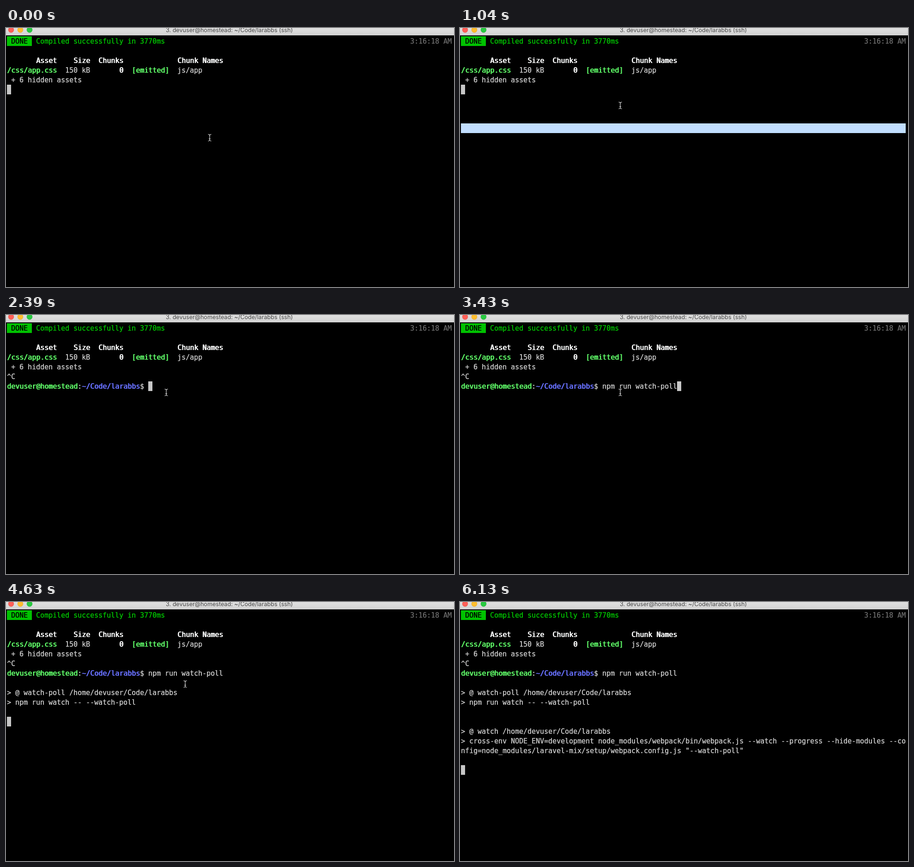
Animation, 970 px wide and 562 px high, one loop 7980 ms. Source, as an HTML page with a canvas:

```html
<!DOCTYPE html>
<html lang="en">
<head>
<meta charset="utf-8">
<title>Terminal session</title>
<style>
  html, body { margin: 0; width: 100%; height: 100%; overflow: hidden; background: #000; }
  canvas { display: block; width: 970px; height: 562px; }
</style>
</head>
<body>
<canvas id="stage" width="970" height="562"></canvas>
<script>
const ctx = document.getElementById('stage').getContext('2d');
const W = 970, H = 562, LOOP = 7980, BAR_H = 16;
const CELL_W = 9, CELL_H = 21, LEFT = 2, TOP = 18;
const MONO = '15px "DejaVu Sans Mono", monospace';
const GRAY = '#c7c7c7', WHITE = '#feffff', GREEN = '#00c200',
      LIME = '#5ffa68', BLUE = '#6871ff', DIM = '#686868';

const USER = 'devuser', HOST = 'homestead';
const PROJECT = '~/Code/larabbs';
const HOME_PATH = `/home/${USER}/Code/larabbs`;

// Each entry: start time, row, column, text, colour, bold
const LINES = [
  [0, 0, 1, 'DONE', '#000'],
  [0, 0, 7, 'Compiled successfully in 3770ms', GREEN],
  [0, 0, 97, '3:16:18 AM', DIM],
  [0, 2, 7, 'Asset    Size  Chunks             Chunk Names', WHITE, true],
  [0, 3, 0, '/css/app.css', LIME, true],
  [0, 3, 14, '150 kB', GRAY],
  [0, 3, 27, '0', WHITE, true],
  [0, 3, 30, '[emitted]', LIME, true],
  [0, 3, 41, 'js/app', GRAY],
  [0, 4, 1, '+ 6 hidden assets', GRAY],
  [2390, 5, 0, '^C', GRAY],
  [2390, 6, 0, `${USER}@${HOST}`, LIME, true],
  [2390, 6, 17, ':', GRAY],
  [2390, 6, 18, PROJECT, BLUE, true],
  [2390, 6, 32, '$', GRAY],
  [3430, 6, 34, 'npm run watch-poll', GRAY],
  [4480, 8, 0, `> @ watch-poll ${HOME_PATH}`, GRAY],
  [4480, 9, 0, '> npm run watch -- --watch-poll', GRAY],
  [4930, 12, 0, `> @ watch ${HOME_PATH}`, GRAY],
  [4930, 13, 0, '> cross-env NODE_ENV=development node_modules/webpack/bin/webpack.js --watch --progress --hide-modules --co', GRAY],
  [4930, 14, 0, 'nfig=node_modules/laravel-mix/setup/webpack.config.js "--watch-poll"', GRAY]
];

// Start time, row, column
const CARET = [[0, 5, 0], [2390, 6, 34], [3430, 6, 52], [4030, 7, 0], [4480, 11, 0], [4930, 16, 0]];

// Start time, centre x, centre y; no position means hidden
const POINTER = [
  [0, 441, 238], [150, 389, 226], [890, 352, 171], [1040, 347, 168],
  [4630, 388, 178], [4780, 385, 214], [4930, 404, 219], [5080, 505, 310],
  [5380, 518, 310], [5530, 655, 332], [5830, 899, 493], [5980, 902, 507], [6130]
];

const BUTTONS = [['#ff5f57', '#e2463f'], ['#ffbd2e', '#e1a116'], ['#28c940', '#12ac28']];

const stepAt = (steps, t) => steps.filter(s => s[0] <= t).pop();

function fillCells(row, col, count, color) {
  ctx.fillStyle = color;
  ctx.fillRect(LEFT + col * CELL_W, TOP + row * CELL_H, count * CELL_W, CELL_H);
}

// A second, slightly shifted pass thickens the strokes
function drawText(row, col, text, color, bold) {
  ctx.font = MONO;
  ctx.textAlign = 'left';
  ctx.fillStyle = color;
  const y = TOP + row * CELL_H + 16;
  const shift = bold ? 0.9 : 0.2;
  [...text].forEach((ch, i) => {
    const x = LEFT + (col + i) * CELL_W;
    ctx.fillText(ch, x, y);
    ctx.fillText(ch, x + shift, y);
  });
}

function drawTitleBar() {
  const shade = ctx.createLinearGradient(0, 0, 0, BAR_H);
  shade.addColorStop(0, '#e0e0e0');
  shade.addColorStop(1, '#d2d2d2');
  ctx.fillStyle = shade;
  ctx.fillRect(0, 0, W, BAR_H);
  ctx.lineWidth = 0.6;
  BUTTONS.forEach(([fill, rim], i) => {
    ctx.fillStyle = fill;
    ctx.strokeStyle = rim;
    ctx.beginPath();
    ctx.arc(11 + i * 20, 4, 5.9, 0, Math.PI * 2);
    ctx.fill();
    ctx.stroke();
  });
  ctx.font = '12.6px Inter, sans-serif';
  ctx.textAlign = 'center';
  ctx.fillStyle = '#464646';
  ctx.fillText(`3. ${USER}@${HOST}: ${PROJECT} (ssh)`, 483.5, 9);
}

// The I-beam inverts whatever lies below it
function drawPointer(x, y) {
  ctx.save();
  ctx.translate(x, y);
  ctx.globalCompositeOperation = 'difference';
  ctx.strokeStyle = '#f0f0f0';
  ctx.lineWidth = 1.1;
  ctx.beginPath();
  for (const s of [-1, 1]) {
    ctx.moveTo(-3.5, s * 7.3);
    ctx.quadraticCurveTo(-0.4, s * 7.3, 0, s * 5);
    ctx.quadraticCurveTo(0.4, s * 7.3, 3.5, s * 7.3);
  }
  ctx.moveTo(0, -5);
  ctx.lineTo(0, 5);
  ctx.moveTo(-1.8, 2.5);
  ctx.lineTo(1.8, 2.5);
  ctx.stroke();
  ctx.restore();
}

function draw(t) {
  ctx.fillStyle = '#000';
  ctx.fillRect(0, 0, W, H);
  drawTitleBar();
  fillCells(0, 0, 6, GREEN);
  if (t >= 600 && t < 1190) fillCells(9, 0, 107, '#c1deff');
  for (const [start, ...line] of LINES) {
    if (t >= start) drawText(...line);
  }
  const [, row, col] = stepAt(CARET, t);
  fillCells(row, col, 1, GRAY);
  const [, x, y] = stepAt(POINTER, t);
  if (x !== undefined) drawPointer(x, y);
}

const begin = performance.now();
function tick() {
  draw((performance.now() - begin) % LOOP);
  requestAnimationFrame(tick);
}
tick();
</script>
</body>
</html>
```
